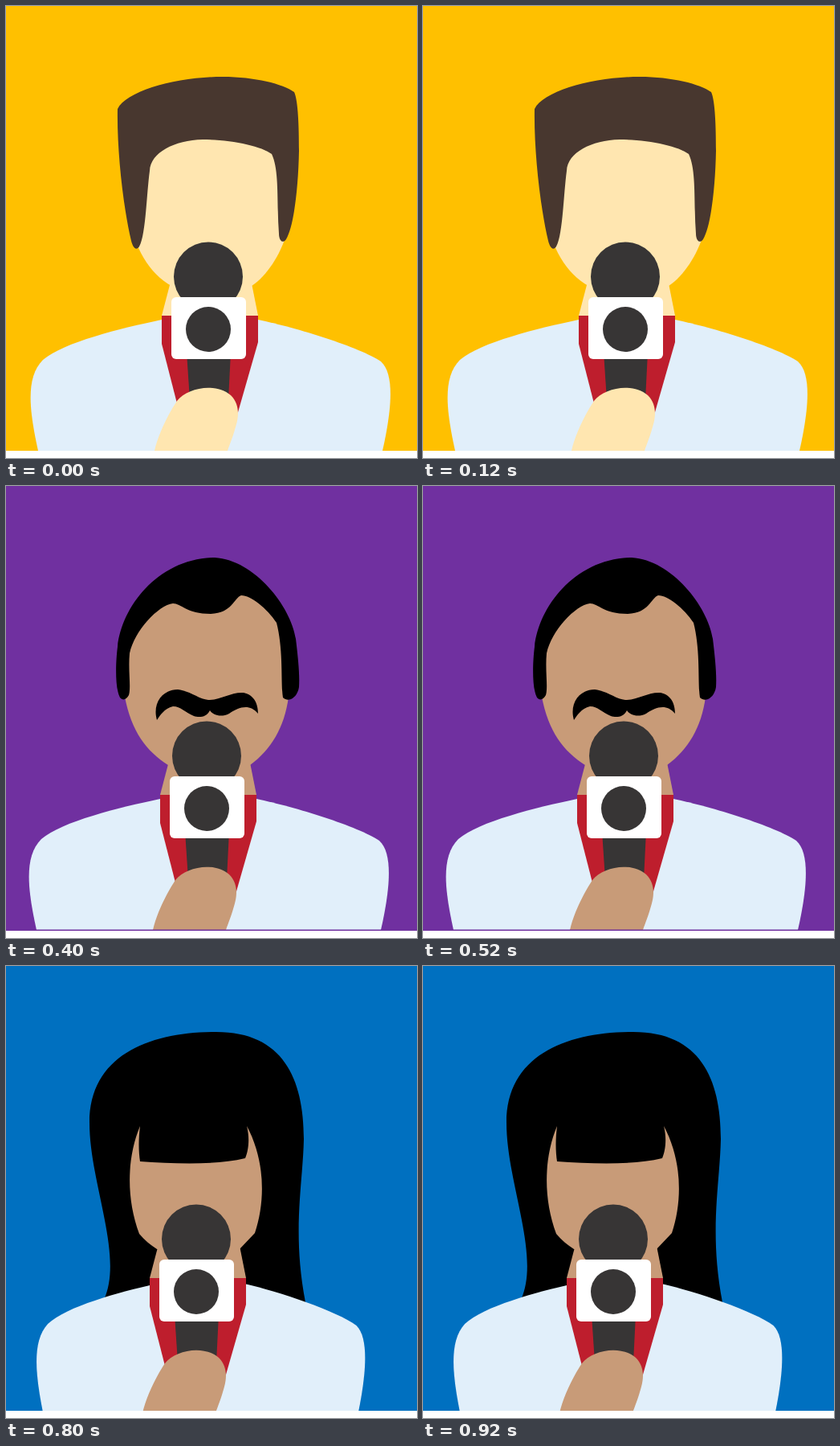
An HTML page for the animation above (1000 ms loop, 512 by 562 pixels).

```html
<!DOCTYPE html>
<html lang="en">
<head>
<meta charset="utf-8">
<title>Reporters</title>
<style>
html, body { margin: 0; width: 100%; height: 100%; overflow: hidden; background: #fff; }
svg { display: block; width: 100vw; height: 100vh; }
</style>
</head>
<body>
<svg id="stage" viewBox="0 0 512 562">
  <defs>
    <path id="shirt" fill="#e1effa" d="M43 566 L40 553 C29 503 24 462 46 440 C72 418 142 401 194 390
      H314 C362 400 440 424 467 442 C485 458 480 505 469 553 L466 566Z"/>
    <g id="front">
      <path fill="#be1e2d" d="M194 385H314V418L289 505L276 545H230L213 494L194 420Z"/>
      <path fill="currentColor" d="M204.500 345H306L314 385H194Z"/>
      <path fill="#373535" d="M225 430H280L277 490H229Z"/>
      <circle cx="252" cy="336.5" r="43" fill="#373535"/>
      <rect x="206" y="362" width="93" height="77" rx="6" fill="#fff"/>
      <circle cx="252" cy="402" r="28" fill="#373535"/>
      <path fill="currentColor" d="M182 566L185 553C190 531 203 506 213 491C226 474 262 468 280 484
        C291 495 290 509 287 520C283 535 279 544 276 553L272 566Z"/>
    </g>
  </defs>
  <g id="scenes"></g>
  <rect y="553" width="512" height="9" fill="#fff"/>
</svg>
<script>
const LIGHT = '#ffe6b0', TAN = '#c89b78', BROWN = '#48372f', BLACK = '#000';
const STEP = 200;

// front: offset of neck, microphone and hand; shirt: centre x, offset y, x scale
const people = [
  { bg: '#ffc000', skin: LIGHT, hair: BROWN, front: [0, 0], shirt: [254, 0, 1],
    parts: [
      ['skin', 'M151 250C158 300 178 332 206 348H306C325 336 342 308 349 285L345 160H170Z'],
      ['hair', 'M139 128C150 105 215 88 270 88C310 88 345 97 359 107C364 118 365 150 365 180C364 230 358 275 349 290C345 296 340 292 340 283C337 245 341 205 331 184C318 174 280 166 245 166C210 167 180 182 179 205C175 235 174 285 166 299C162 305 158 300 156 292C146 250 138 180 139 128Z']
    ] },
  { bg: '#00b050', skin: LIGHT, hair: BLACK, front: [-2, 2.5], shirt: [252, 2.5, 1],
    parts: [
      ['hair', 'M163 311C135 280 119 240 119 200C119 130 165 81 228 81C250 81 270 86 284 92C335 79 373 140 373 208C373 250 360 285 337 311Z'],
      ['skin', 'M163 311C161 240 175 177 243 177C258 177 270 182 279 187C315 190 340 240 338 300L337 312C328 328 318 340 304 349H202C185 340 173 327 163 311Z']
    ] },
  { bg: '#7030a0', skin: TAN, hair: BLACK, front: [-2, -1], shirt: [252, -1, 1], gap: 1.5,
    parts: [
      ['skin', 'M148 262C156 305 175 330 202 347H304C330 328 347 300 352 262L340 150L250 120L165 150L149 200Z'],
      ['hair', 'M142 263C135 250 137 215 139 200C144 150 190 90 260 89C310 92 355 150 361 190C364 215 366 235 365 250C363 263 352 270 345 263C342 245 346 205 337 170C325 152 305 136 293 136C284 139 282 158 255 159C225 159 218 146 208 146C190 148 160 180 154 208C152 230 156 250 153 260C150 266 145 267 142 263Z'],
      ['hair', 'M188 291C182 270 195 253 214 253C230 255 240 265 252 266C268 266 280 256 296 257C310 260 314 272 314 283C303 270 290 275 278 283C268 288 258 285 254 279C250 288 240 288 234 286C222 281 218 274 208 274C197 277 192 285 188 291Z']
    ] },
  { bg: '#ff0000', skin: LIGHT, hair: BROWN, front: [-16.5, 1.5], shirt: [238.5, 1.5, .831],
    parts: [
      ['hair', 'M187 344C135 350 93 270 93 212C93 130 160 81 235 81C270 81 300 92 308 111C345 143 364 180 364 220C364 265 340 305 310 329Z'],
      ['skin', 'M187 350C160 330 150 295 151 270C152 240 170 234 221 217C208 231 190 238 169 248C215 244 240 224 272 197C305 215 319 250 319 280C319 300 315 320 310 329C303 338 297 344 290 349Z']
    ] },
  { bg: '#0070c0', skin: TAN, hair: BLACK, front: [-15, 3], shirt: [242, 5, .913],
    parts: [
      ['hair', 'M122 415C147 360 104 270 104 195C104 110 180 82 262 82C345 82 371 140 371 215C370 270 356 330 373 418Z'],
      ['skin', 'M167 199C150 240 150 290 166 333C173 341 180 347 188 352H291L310 332C324 290 322 240 300 199C304 215 302 230 298 239C260 248 210 246 167 243C165 230 165 215 167 199Z']
    ] }
];

function draw({ bg, skin, hair, front, shirt: [cx, dy, width], gap = 0, parts }) {
  const tones = { skin, hair };
  const head = parts.map(([tone, d]) => `<path fill="${tones[tone]}" d="${d}"/>`).join('');
  return `<g color="${skin}">
    <rect width="512" height="553" fill="${bg}"/>${head}
    <use href="#shirt" transform="translate(${cx} ${dy}) scale(${width} 1) translate(-254 0)"/>
    <use href="#front" x="${front[0]}" y="${front[1]}"/>
    <rect y="${553 - gap}" width="512" height="${gap}" fill="${bg}"/></g>`;
}

const scenes = document.getElementById('scenes');
scenes.innerHTML = people.map(draw).join('');

const start = performance.now();
function show(now) {
  const current = Math.floor(Math.max(0, now - start) / STEP) % people.length;
  [...scenes.children].forEach((g, i) => g.style.display = i === current ? '' : 'none');
  requestAnimationFrame(show);
}
show(start);
</script>
</body>
</html>
```
